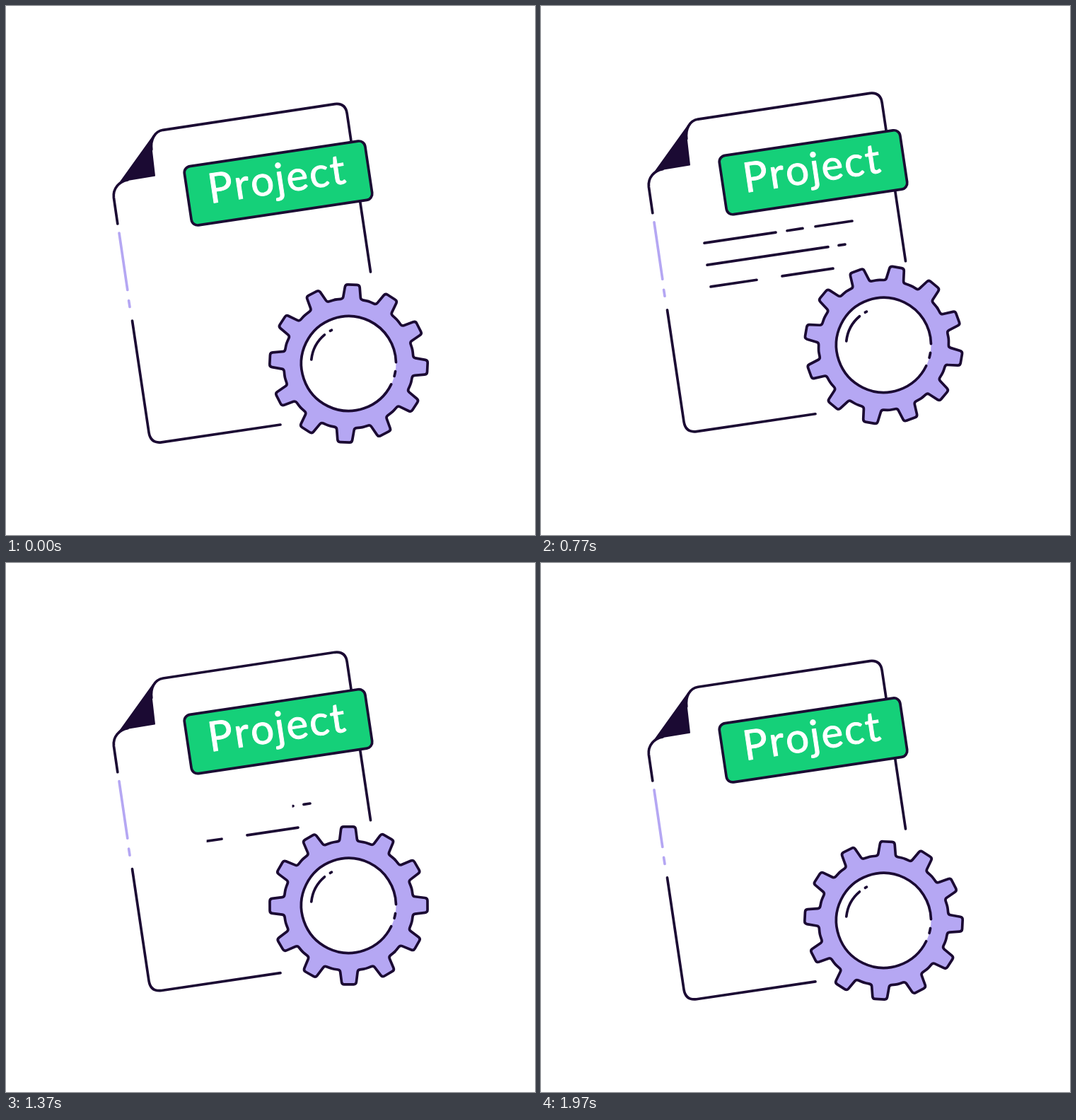
Recreate the animation shown at these times as an HTML page with a canvas. Size 748 by 748 pixels, loop 2 s.

```html
<!DOCTYPE html>
<html lang="en">
<head>
<meta charset="utf-8">
<title>Project settings</title>
<style>
html, body { margin: 0; width: 100%; height: 100%; overflow: hidden; background: #fff; }
canvas { display: block; }
</style>
</head>
<body>
<canvas id="stage" width="748" height="748"></canvas>
<script>
const ctx = document.getElementById('stage').getContext('2d');
const INK = '#1b0a33', LILAC = '#b5a7f3', GREEN = '#15d079';
const LOOP = 2000, STEP = LOOP / 60, DEG = Math.PI / 180;

const clamp = x => Math.min(1, Math.max(0, x));
const smooth = x => (x = clamp(x), x * x * (3 - 2 * x));
const smoother = x => (x = clamp(x), x * x * x * (x * (6 * x - 15) + 10));

const page = new Path2D(`M388 592 L220 616.8 Q204.5 618.8 202 603 L178.5 445
  M157.8 308 L152.4 271 C151 258 160 248 172 246
  M205.8 203 C204 189 210 177.5 222 175.3 L465 138.6 Q480 137 482.2 152 L515.5 376`);
const fold = new Path2D(`M158.5 253.5 L208 184.5 C206.3 189 204.8 196 205.8 203
  L210 239.8 L172 246 C167 246.8 162 250 158.5 253.5Z`);
const edgeDashes = new Path2D('M160 321 L171.8 401.5 M173.6 416.5 L175 425.5');

// Text rows: left end's height, the dashes as x ranges, and when erasing begins.
const rows = [
  { y: 350.4, dashes: [[231, 332], [348, 370], [388, 440]], gone: 933 },
  { y: 381.4, dashes: [[235, 406], [421, 430]], gone: 1130 },
  { y: 412.2, dashes: [[240, 305], [341, 413]], gone: 1263 }
];

function strokePath(path, color = INK) {
  ctx.strokeStyle = color;
  ctx.stroke(path);
}

function arc(radius, from, to) {
  const path = new Path2D();
  path.arc(0, 0, radius, from * DEG, to * DEG);
  return path;
}

function drawRow({ y, dashes, gone }, i, t) {
  const left = dashes[0][0], right = dashes[dashes.length - 1][1];
  const edge = p => left - 3 + p * (right - left + 6);
  const from = edge(smooth((t - gone) / 310));
  const to = edge(smooth((t - 172 * i) / 430));
  if (to <= from) return;
  ctx.save();
  ctx.beginPath();
  ctx.rect(from, 250, to - from, 250);
  ctx.clip();
  const path = new Path2D();
  for (const [a, b] of dashes) {
    path.moveTo(a, y - (a - left) * .149);
    path.lineTo(b, y - (b - left) * .149);
  }
  strokePath(path);
  ctx.restore();
}

function drawTag(t) {
  ctx.save();
  ctx.translate(385, 250.5);
  ctx.rotate(-8.5 * DEG);
  const box = new Path2D();
  box.roundRect(-129.2, -42.1, 258.4, 84.2, 9);
  ctx.fillStyle = GREEN;
  ctx.fill(box);
  strokePath(box);

  // A dip in opacity sweeps over the letters.
  const dip = t / 74 - 2;
  ctx.font = '58.5px Lato, "Open Sans", sans-serif';
  ctx.fillStyle = ctx.strokeStyle = '#fff';
  ctx.lineWidth = 1;
  let x = -99.5;
  [...'Project'].forEach((letter, i) => {
    ctx.globalAlpha = Math.min(1, (Math.abs(i - dip) / 2) ** 1.5);
    ctx.fillText(letter, x, 14.2);
    ctx.strokeText(letter, x, 14.2);
    x += ctx.measureText(letter).width + 2;
  });
  ctx.restore();
}

function gearPath() {
  const points = [];
  for (let i = 0; i < 12; i++) {
    const a = i * 30 * DEG, cos = Math.cos(a), sin = Math.sin(a);
    for (const [x, y, r] of [[-12.6, -91, 4], [-10, -111.5, 4], [10, -111.5, 4], [12.6, -91, 4]])
      points.push([x * cos - y * sin, x * sin + y * cos, r]);
    const m = a + 15 * DEG;
    points.push([92.4 * Math.sin(m), -92.4 * Math.cos(m), 30]);
  }
  const path = new Path2D(), last = points[points.length - 1];
  path.moveTo(last[0], last[1]);
  points.forEach(([x, y, r], i) => {
    const next = points[(i + 1) % points.length];
    path.arcTo(x, y, next[0], next[1], r);
  });
  path.closePath();
  return path;
}
const gear = gearPath();

function drawGear(t, lift) {
  ctx.save();
  ctx.translate(484.5, 505.5 - 30 * lift);
  ctx.save();
  ctx.rotate((2.8 + 150 * smoother((t - 45) / 1530)) * DEG);
  ctx.fillStyle = LILAC;
  ctx.fill(gear);
  strokePath(gear);
  ctx.restore();

  ctx.fillStyle = '#fff';
  ctx.fill(arc(67, 0, 360));
  strokePath(arc(67, 26, 358.5));
  strokePath(arc(67, 9.5, 15.5));
  strokePath(arc(53, 186, 230));
  strokePath(arc(53, 240.5, 243));
  ctx.restore();
}

function draw(now) {
  const t = Math.floor((now % LOOP + 4) / STEP) % 60 * STEP;
  const lift = (1 - Math.cos(t / LOOP * 2 * Math.PI)) / 2;
  ctx.fillStyle = '#fff';
  ctx.fillRect(0, 0, 748, 748);
  ctx.lineWidth = 3.7;
  ctx.lineCap = ctx.lineJoin = 'round';

  ctx.save();
  ctx.translate(0, -17.5 * lift);
  strokePath(page);
  ctx.fillStyle = INK;
  ctx.fill(fold);
  ctx.lineWidth = 2;
  strokePath(fold);
  ctx.lineWidth = 3.7;
  strokePath(edgeDashes, LILAC);
  rows.forEach((row, i) => drawRow(row, i, t));
  drawTag(t);
  ctx.restore();
  drawGear(t, lift);
}

const start = performance.now();
function tick() {
  draw(performance.now() - start);
  requestAnimationFrame(tick);
}
tick();
</script>
</body>
</html>
```
